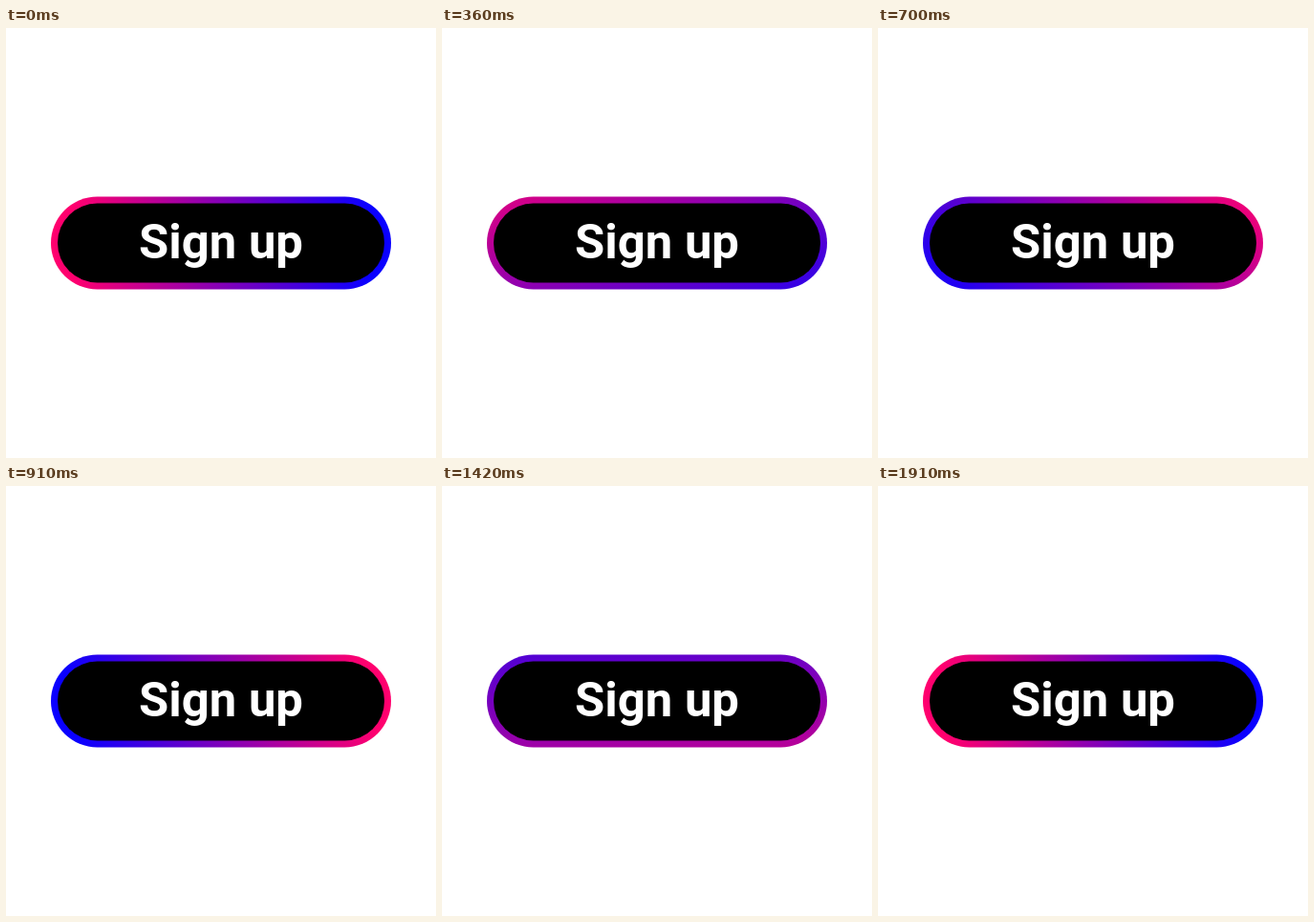
An HTML page that plays this animation: 450x450 px, repeating every 1940 ms.

```html
<!DOCTYPE html>
<html lang="en">
<head>
<meta charset="utf-8">
<title>Sign up button</title>
<style>
  html, body { margin: 0; width: 100%; height: 100%; overflow: hidden; background: #fff; }
  svg { display: block; width: 100%; height: 100%; }
  text { font: 700 50.8px Roboto, Arial, sans-serif; text-anchor: middle; fill: #fff; }
</style>
</head>
<body>
<svg viewBox="0 0 450 450">
  <linearGradient id="glow" gradientUnits="userSpaceOnUse" x1="70" y1="225" x2="380" y2="225">
    <stop offset="0" stop-color="#ff006e"/>
    <stop offset="1" stop-color="#0a00ff"/>
  </linearGradient>
  <rect x="47" y="176.5" width="356" height="97" rx="48.5" fill="url(#glow)"/>
  <rect x="54" y="183.5" width="342" height="83" rx="41.5"/>
  <text x="225" y="241">Sign up</text>
</svg>
<script>
  const LOOP = 1940;
  const glow = document.getElementById('glow');

  // The border gradient makes one clockwise turn per loop.
  function draw() {
    const angle = performance.now() % LOOP / LOOP * 360;
    glow.setAttribute('gradientTransform', `rotate(${angle} 225 225)`);
    requestAnimationFrame(draw);
  }
  draw();
</script>
</body>
</html>
```
